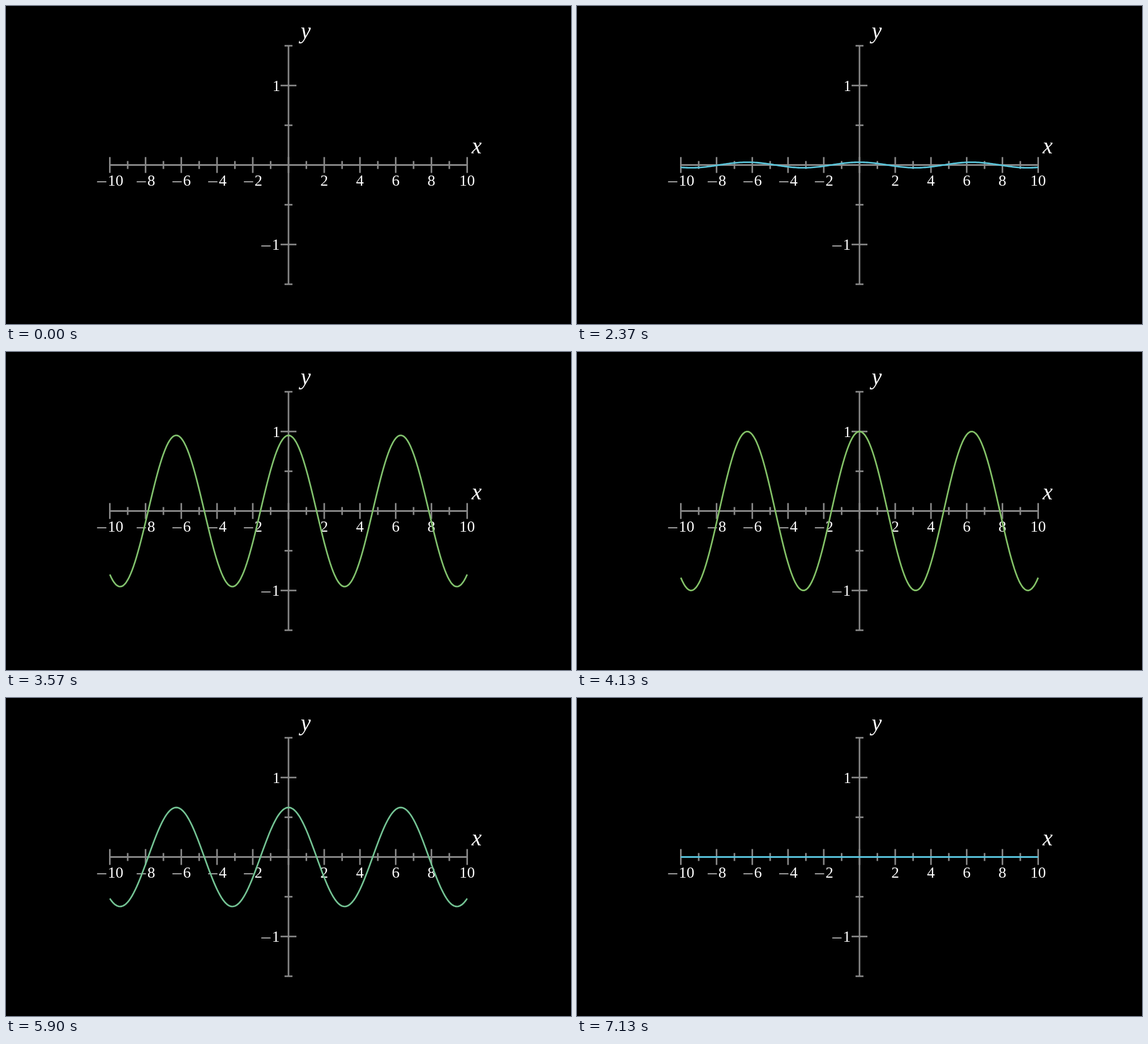
An HTML page for the animation above (8000 ms loop, 998 by 561 pixels).

```html
<!DOCTYPE html>
<html lang="en">
<head>
<meta charset="utf-8">
<title>Cosine amplitude</title>
<style>
  html, body { margin: 0; width: 100%; height: 100%; overflow: hidden; background: #000; }
  svg { display: block; width: 100%; height: 100%; }
  text { font-family: "Liberation Serif", "Times New Roman", serif; font-size: 27.5px; fill: #fff; text-anchor: middle; }
  .name { font-size: 40px; font-style: italic; }
  .axis { stroke: #888; stroke-width: 2.8; fill: none; }
  .minus { stroke: #fff; stroke-width: 1.2; stroke-linecap: round; }
  #curve { fill: none; stroke-width: 2.8; stroke-linejoin: round; }
</style>
</head>
<body>
<svg viewBox="0 0 998 561">
  <g id="axes"></g>
  <g id="labels">
    <text class="name" x="529.4" y="56.5">y</text>
    <text class="name" x="831.5" y="260">x</text>
  </g>
  <path id="curve"/>
</svg>
<script>
const LOOP = 8000;
const CX = 499, CY = 280.5, UX = 31.56, UY = 140.25, EM = 27.5;
const BLUE = [88, 196, 221], GREEN = [131, 193, 103];
const axes = document.getElementById("axes");
const labels = document.getElementById("labels");
const curve = document.getElementById("curve");

const px = x => CX + x * UX;
const py = y => CY - y * UY;

function add(parent, tag, attrs, text = "") {
  const el = document.createElementNS("http://www.w3.org/2000/svg", tag);
  for (const key in attrs) el.setAttribute(key, attrs[key]);
  el.textContent = text;
  parent.appendChild(el);
}

function line(parent, cls, x1, y1, x2, y2) {
  add(parent, "line", { class: cls, x1, y1, x2, y2 });
}

// Negative numbers get a wide, thin minus placed before the digits.
function label(value, center, baseline) {
  const digits = String(Math.abs(value));
  let x = center;
  if (value < 0) {
    const width = (0.778 + 0.5 * digits.length) * EM - 3.4;
    const left = center - width / 2;
    line(labels, "minus", left + 0.6, baseline - 6.9, left + 16.2, baseline - 6.9);
    x = left + 19.1 + digits.length * EM / 4;
  }
  add(labels, "text", { x, y: baseline }, digits);
}

function buildAxes() {
  line(axes, "axis", px(-10), CY, px(10), CY);
  line(axes, "axis", CX, py(-1.5), CX, py(1.5));
  for (let i = -10; i <= 10; i++) {
    const half = i % 2 ? 7 : 14;
    line(axes, "axis", px(i), CY - half, px(i), CY + half);
    if (i && i % 2 === 0) label(i, px(i), 317);
  }
  for (let i = -3; i <= 3; i++) {
    const half = i % 2 ? 7 : 14;
    line(axes, "axis", CX - half, py(i / 2), CX + half, py(i / 2));
  }
  label(1, 477.5, 149.8);
  label(-1, 466.6, 430.2);
}

const sigmoid = v => 1 / (1 + Math.exp(-v));

// Normalised logistic ease from 0 to 1.
function smooth(u) {
  u = Math.min(1, Math.max(0, u));
  const edge = sigmoid(-5);
  return (sigmoid(10 * (u - 0.5)) - edge) / (1 - 2 * edge);
}

function render(t) {
  const drawn = smooth(t / 1000);
  const amp = smooth((t - 2000) / 2000) - smooth((t - 5000) / 2000);
  const steps = 240;
  let d = "";
  for (let i = 0; i <= steps; i++) {
    const x = -10 + 20 * drawn * i / steps;
    d += (i ? "L" : "M") + px(x).toFixed(2) + " " + py(amp * Math.cos(x)).toFixed(2);
  }
  const color = BLUE.map((c, i) => Math.round(c + (GREEN[i] - c) * amp));
  curve.setAttribute("d", drawn > 0 ? d : "");
  curve.setAttribute("stroke", `rgb(${color})`);
}

buildAxes();
render(0);
const start = performance.now();
function tick() {
  render((performance.now() - start) % LOOP);
  requestAnimationFrame(tick);
}
requestAnimationFrame(tick);
</script>
</body>
</html>
```
